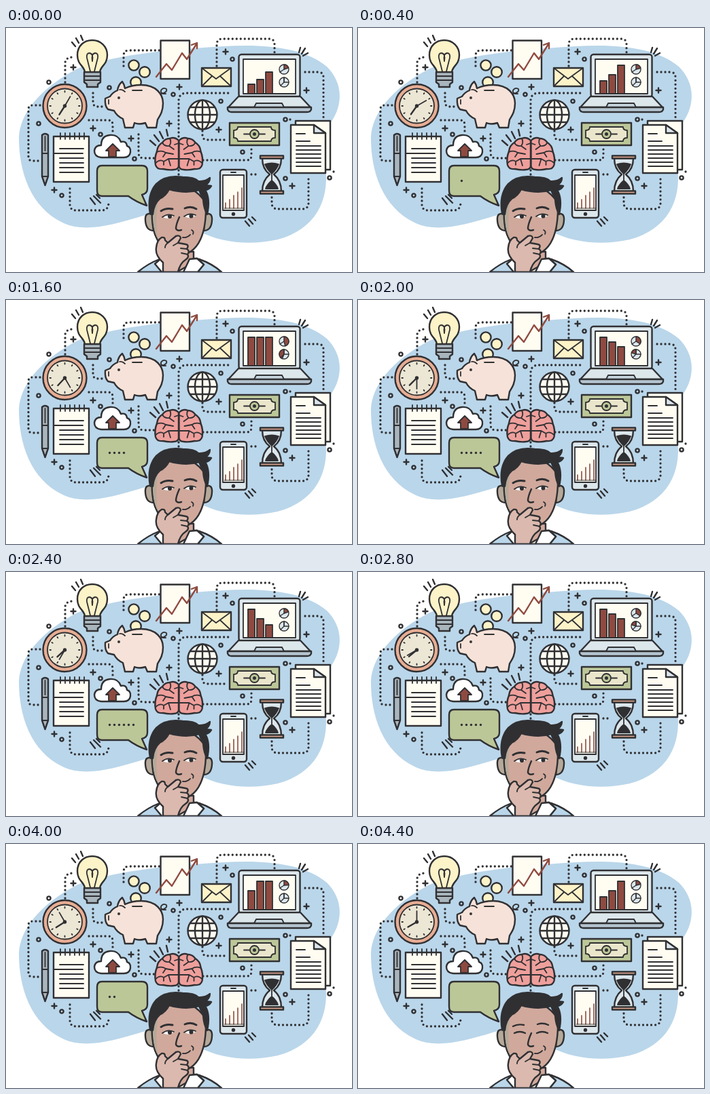
Animation, 509 px wide and 360 px high, one loop 4.8 s. Source, as an HTML page:

```html
<!DOCTYPE html>
<html lang="en">
<head>
<meta charset="utf-8">
<title>Thinking</title>
<style>
html, body { margin: 0; width: 100%; height: 100%; overflow: hidden; background: #fff; }
svg { display: block; width: 509px; height: 360px; }
.ink { fill: none; stroke: #303033; stroke-width: 2.4; stroke-linecap: round; stroke-linejoin: round; }
.thin { stroke-width: 1.8; }
.dots { stroke-width: 3.3; stroke-dasharray: 0 6; }
.cream { fill: #fffdf2; }
.yellow { fill: #fdf3c9; }
.grey { fill: #dce7ec; }
.steel { fill: #a9b5bc; }
.green { fill: #bcc798; }
.skin { fill: #d0a99c; }
.hand { fill: #dbb9ae; }
.shade { fill: #b5a999; }
.salmon { fill: #e7ad93; }
.red { fill: #8f4a40; }
.dark { fill: #303033; }
.white { fill: #fff; }
.sky { fill: #bad6ea; }
</style>
</head>
<body>
<svg viewBox="0 0 509 360">
<path class="sky" d="M19 162C20 128 48 90 105 60C170 36 260 31 320 27C385 23 440 30 472 57C495 80 497 112 478 139L470 205C476 255 455 297 400 312C360 321 315 317 285 300C262 276 235 270 205 276C150 293 115 301 85 288C35 265 19 210 19 162Z"/>

<path class="ink dots" d="M50 114H39Q33 114 33 120V190Q33 196 39 196H50M87 80V52Q87 44 97 43M128 96V109Q128 116 135 116H146M122 136H150Q157 136 157 143V156M173 56V41Q173 33 181 33H226M195 157V184Q195 192 203 192H220M254 160V108Q254 96 266 96H328M289 152V158Q289 165 296 165H326M290 195H354Q361 195 361 188V177M310 56V25Q310 16 318 16H387Q395 16 395 24V36M440 65H459Q467 65 467 73V135M94 237V260Q94 269 103 269H141Q151 269 151 257M361 216H372M391 250V258Q391 267 400 267H436Q445 267 445 258V218M254 210V222M418 135H424M482 212V213"/>
<path class="ink" id="pluses"/>
<path class="ink" id="rings"/>
<path class="ink" d="M97 21L102 27M103 15L107 22M110 11L113 18M431 36L433 29M435 38L440 30M437 41L444 37M212 166L220 173M218 158L225 167M226 153L231 163M236 150L238 159M124 251L131 260M129 248L139 258M133 246L138 251M352 285L358 292M357 282L363 289M362 279L367 284"/>

<!-- bulb -->
<g class="ink">
<path class="yellow" d="M116 66C116 56 105 55 105 40C105 26 115 18 127 18S149 27 149 40C149 55 138 56 138 66Z"/>
<path class="thin" d="M124 64L119 44Q118 37 123 37Q129 38 127 49Q125 38 131 37Q136 37 135 44L130 64"/>
<path class="steel" d="M115 65H139V80L135 83V87H119V83L115 80Z"/>
<path class="thin" d="M116 71H138M116 77H138"/>
</g>

<!-- clock -->
<g class="ink">
<circle class="salmon" cx="86.5" cy="115" r="32"/>
<circle class="thin" cx="86.5" cy="115" r="25.5" fill="#ece6d4"/>
<path class="thin" id="ticks"/>
<path id="hour" d="M86.5 115V100"/>
<path class="thin" id="minute" d="M86.5 115V99"/>
<circle class="dark" cx="86.5" cy="115" r="1.5"/>
</g>

<!-- piggy bank -->
<g class="ink">
<g class="yellow"><circle cx="188" cy="55" r="7.6"/><circle cx="204" cy="65" r="7.8"/><circle cx="191" cy="80" r="7.8"/></g>
<path fill="#f6e2d8" d="M171 79Q174 83 175 89Q185 84 199 84C220 84 231 97 231 111C231 124 226 130 223 135L221 147H208L205 140Q196 143 189 140L187 147H175L172 134Q163 130 159 122L150 120Q145 115 146 104L153 101Q157 95 164 92Q165 84 171 79Z"/>
<path class="thin" d="M186 92H200M167 91Q171 90 175 94M151 106V112M228 97Q238 95 236 90Q231 87 228 92Q227 98 235 97"/>
<circle class="dark" cx="166" cy="103" r=".8"/>
</g>

<!-- growth sheet, envelope -->
<g class="ink">
<path class="cream" d="M227.5 18.5H270V75H227.5Z"/>
<path d="M221 72L236 53L244 62L259 37L266 46L280 24M273 25L281 22L281 30" style="stroke:#8f4a40"/>
<path class="yellow" d="M288 59H331V86H288Z"/>
<path class="thin" d="M288 59L309 75L331 59M288 86L303 71M331 86L315 71"/>
</g>

<!-- laptop -->
<g class="ink">
<rect class="grey" x="342.5" y="39" width="90" height="63" rx="4"/>
<path class="cream thin" d="M349 46H426V97H349Z"/>
<g class="red thin" id="bars"><rect x="356" width="10"/><rect x="369" width="10"/><rect x="382" width="10"/></g>
<g stroke-width="1.4">
<circle class="grey" cx="409" cy="61" r="7"/><path class="red" id="topSlice"/><path d="M409 61L403 65"/>
<circle class="grey" cx="409" cy="80" r="7"/><path class="red" id="lowSlice"/><path d="M409 73V80H416M409 80L404 85"/>
</g>
<path class="grey" d="M342 101H433L448 117H327Z"/>
<path class="thin" d="M368 111H406L409 117H365Z" fill="#c5d4dd"/>
<path fill="#b4c5d0" d="M326 117H449V120Q448 124 443 124H332Q327 124 326 120Z"/>
</g>

<!-- globe -->
<g class="ink">
<circle class="cream" cx="289" cy="128" r="21.5"/>
<ellipse cx="289" cy="128" rx="11" ry="21.5"/>
<path d="M289 107V149M268 128H310M271 117H307M271 139H307"/>
</g>

<!-- banknote -->
<g class="ink">
<path class="green" d="M329 140H402V173H329Z"/>
<path class="thin" fill="#eae6cc" d="M341 146H390Q390 151 396 151V162Q390 162 390 167H341Q341 162 335 162V151Q341 151 341 146Z"/>
<circle class="green thin" cx="365.5" cy="156.5" r="6.5"/>
<path class="thin" d="M350 156.5H358M373 156.5H381"/>
<circle class="dark" cx="365.5" cy="156.5" r="1.3"/>
</g>

<!-- brain -->
<g class="ink">
<g id="lobe">
<path fill="#ee9f9b" d="M254 166Q248 160 241 163Q234 163 230 169Q223 173 222 182Q218 192 220 202Q222 209 231 208Q240 210 247 209Q253 209 254 204Z"/>
<path class="thin" d="M230 169Q233 175 240 174L247 179M241 163Q244 169 240 174M222 183Q229 180 235 184L246 186M235 184L231 190M220 199Q227 193 232 197L239 193H253M232 197V202M239 193L242 203M254 170L248 172"/>
</g>
<use href="#lobe" transform="matrix(-1 0 0 1 508.5 0)"/>
</g>

<!-- notebook and pen -->
<g class="ink">
<path class="cream" d="M70 160H122V227H70Z"/>
<path class="thin" d="M80 155V164M87 155V164M94 155V164M101 155V164M108 155V164M115 155V164M79 178H114M71 185H113M79 192H114M79 199H114M79 206H114M79 213H114"/>
<path class="steel" d="M53 158Q57.5 154 62 158V219L57.5 232L53 219Z"/>
<path class="thin" d="M53 185H62M53 219H62M57.5 160V181M62 164V178"/>
</g>

<!-- cloud -->
<g class="ink">
<path class="white" d="M140 191Q130 190 130 181Q131 173 140 173Q140 159 153 158Q165 157 169 168Q177 166 178 174Q184 176 183 183Q182 191 173 191Z"/>
<path class="red thin" d="M157 171L167 181H162V190H151V181H147Z"/>
</g>

<!-- speech bubble -->
<path class="ink green" d="M141 203H200Q208 203 208 211V237Q208 244 200 246L207 262Q192 257 180 248H141Q134 248 134 240V211Q134 203 141 203Z"/>
<g id="typing" class="dark"></g>

<!-- phone -->
<g class="ink">
<rect class="grey" x="315" y="209" width="39" height="71" rx="4"/>
<path class="cream thin" d="M319 217H350V269H319Z"/>
<path class="thin" d="M331 213H338"/>
<path d="M323 266V258M329 266V253M335 266V247M341 266V242M347 266V236" style="stroke:#8f4a40;stroke-width:1.6"/>
<path stroke-width="1" d="M321 266H349"/>
<circle class="dark" cx="334.5" cy="274.5" r="1.5"/>
</g>

<!-- hourglass -->
<g class="ink">
<path class="grey" d="M377 192H405Q405 208 394 216Q405 225 405 241H377Q377 225 388 216Q377 208 377 192Z"/>
<path class="dark thin" d="M381 201Q391 198 401 201Q398 209 391 215Q384 209 381 201ZM391 225Q398 231 400 237H382Q384 231 391 225ZM391 215V226"/>
<path class="salmon" d="M374 188.5H408V192.5H374ZM374 240.5H408V244.5H374Z"/>
</g>

<!-- documents -->
<g class="ink">
<path class="cream" d="M426 137H477V209H426Z"/>
<path class="cream" d="M419 143H453L470 155V214H419Z"/>
<path class="grey" d="M453 143V155H470Z"/>
<path class="thin" d="M427 156H440M427 167H447M427 174H463M427 180H463M427 186H463M427 192H463M427 198H463M427 204H463"/>
</g>

<!-- man -->
<g class="ink">
<path class="sky" d="M194 360Q208 348 226 341L284 341Q304 348 317 360Z"/>
<path class="white" d="M227 341L219 348L229 360H282L291 349L281 340Z"/>
<path class="skin" d="M229 330H276V346L255 358L232 347Z"/>
<path class="shade" d="M215 275Q204 271 205 284Q206 299 217 299ZM293 275Q304 271 303 284Q302 299 291 299Z"/>
<path class="skin" d="M215 258Q213 293 221 309Q231 332 253 336Q276 334 286 312Q295 293 294 258Q275 228 235 232Z"/>
<path class="shade" stroke="none" d="M217 264Q214 296 224 312Q219 295 223 258Z"/>
<path class="dark" d="M212 274Q207 246 221 230Q235 216 260 220Q277 220 283 226Q293 227 300 221Q300 228 293 232L302 233Q299 239 293 239Q301 252 296 275Q291 267 290 253L284 239Q265 245 240 238Q235 248 226 252Q217 260 216 275Z"/>
<path d="M255 279Q250 290 250 296Q252 300 258 298"/>
<path class="thin" d="M260 309Q266 310 271 305M273 298Q277 300 275 304"/>
<g id="open">
<path stroke-width="3" d="M228 270Q235 265 245 267M263 266Q272 262 280 267"/>
<path class="white" stroke="none" d="M231 279Q238 273 247 277Q240 284 231 279ZM263 278Q270 272 279 277Q272 283 263 278Z"/>
<path class="thin" d="M230 279Q238 273 247 277M262 278Q270 272 279 276"/>
<circle class="dark" cx="241" cy="278" r="1.9"/><circle class="dark" cx="272.5" cy="277.5" r="1.9"/>
</g>
<path id="closed" d="M228 269Q235 265 244 267M264 266Q272 263 280 267M230 279Q238 275 246 279M263 279Q271 275 279 279"/>
<path class="hand" d="M231 360V346Q219 335 221 324Q222 313 229 309Q234 308 234 313L238 317L250 307Q256 305 257 310L253 317L264 319Q270 320 266 326Q271 329 267 334Q270 338 264 342Q256 347 253 360Z"/>
<path class="thin" d="M238 317Q234 320 234 324M253 317L246 321M266 326L257 325M267 334L258 332"/>
<path class="white" d="M270 341L261 360H282L291 349L281 340Z"/>
</g>
</svg>
<script>
const $ = id => document.getElementById(id);
const STEP = 400, COUNT = 12;
const barTops = [[83, 76, 65], [78, 69, 55], [69, 55, 55], [62, 55, 55], [55, 55, 55], [55, 62, 69], [55, 69, 78]];
const shares = [.2, .21, .24, .34, .46, .34, .2];

const plusAt = ([x, y]) => `M${x - 3.5} ${y}h7M${x} ${y - 3.5}v7`;
$('pluses').setAttribute('d', [[99, 58], [128, 148], [184, 163], [71, 239], [240, 141], [255, 87],
  [323, 35], [313, 150], [442, 92], [421, 233]].map(plusAt).join(''));

const ringAt = ([x, y]) => `M${x - 2.6} ${y}a2.6 2.6 0 1 0 5.2 0a2.6 2.6 0 1 0 -5.2 0`;
$('rings').setAttribute('d', [[63, 80], [48, 141], [139, 157], [152, 88], [82, 247], [189, 193], [246, 98],
  [333, 46], [316, 108], [348, 183], [411, 135], [411, 222], [476, 221]].map(ringAt).join(''));

const polar = (x, y, r, turn) => `${x + r * Math.sin(turn * 2 * Math.PI)} ${y - r * Math.cos(turn * 2 * Math.PI)}`;
const wedge = (x, y, from, to) => `M${x} ${y}L${polar(x, y, 7, from)}A7 7 0 0 1 ${polar(x, y, 7, to)}Z`;
$('ticks').setAttribute('d', Array.from({ length: 12 }, (_, n) =>
  `M${polar(86.5, 115, 20.5, n / 12)}L${polar(86.5, 115, 22, n / 12)}`).join(''));

$('typing').innerHTML = Array.from({ length: 6 }, (_, n) => `<circle cx="${152.5 + 7 * n}" cy="225.5" r="1.7"/>`).join('');
const dots = [...$('typing').children];
const bars = [...$('bars').children];
const show = (node, on) => node.style.display = on ? '' : 'none';

function draw(now) {
  const step = Math.floor(now / STEP) % COUNT;
  const level = Math.min(step, COUNT - step);
  const last = step === COUNT - 1;
  const share = shares[level];

  $('minute').setAttribute('transform', `rotate(${30 * (step + 1)} 86.5 115)`);
  $('hour').setAttribute('transform', `rotate(${210 + 2.5 * (step + 1)} 86.5 115)`);
  bars.forEach((bar, n) => {
    bar.setAttribute('y', barTops[level][n]);
    bar.setAttribute('height', 97 - barTops[level][n]);
  });
  $('topSlice').setAttribute('d', wedge(409, 61, 0, share));
  $('lowSlice').setAttribute('d', wedge(409, 80, 1 - Math.max(0, share - .24) * 2, 1));
  dots.forEach((dot, n) => show(dot, n < level && !last));
  show($('open'), !last);
  show($('closed'), last);
  requestAnimationFrame(draw);
}
requestAnimationFrame(draw);
</script>
</body>
</html>
```
